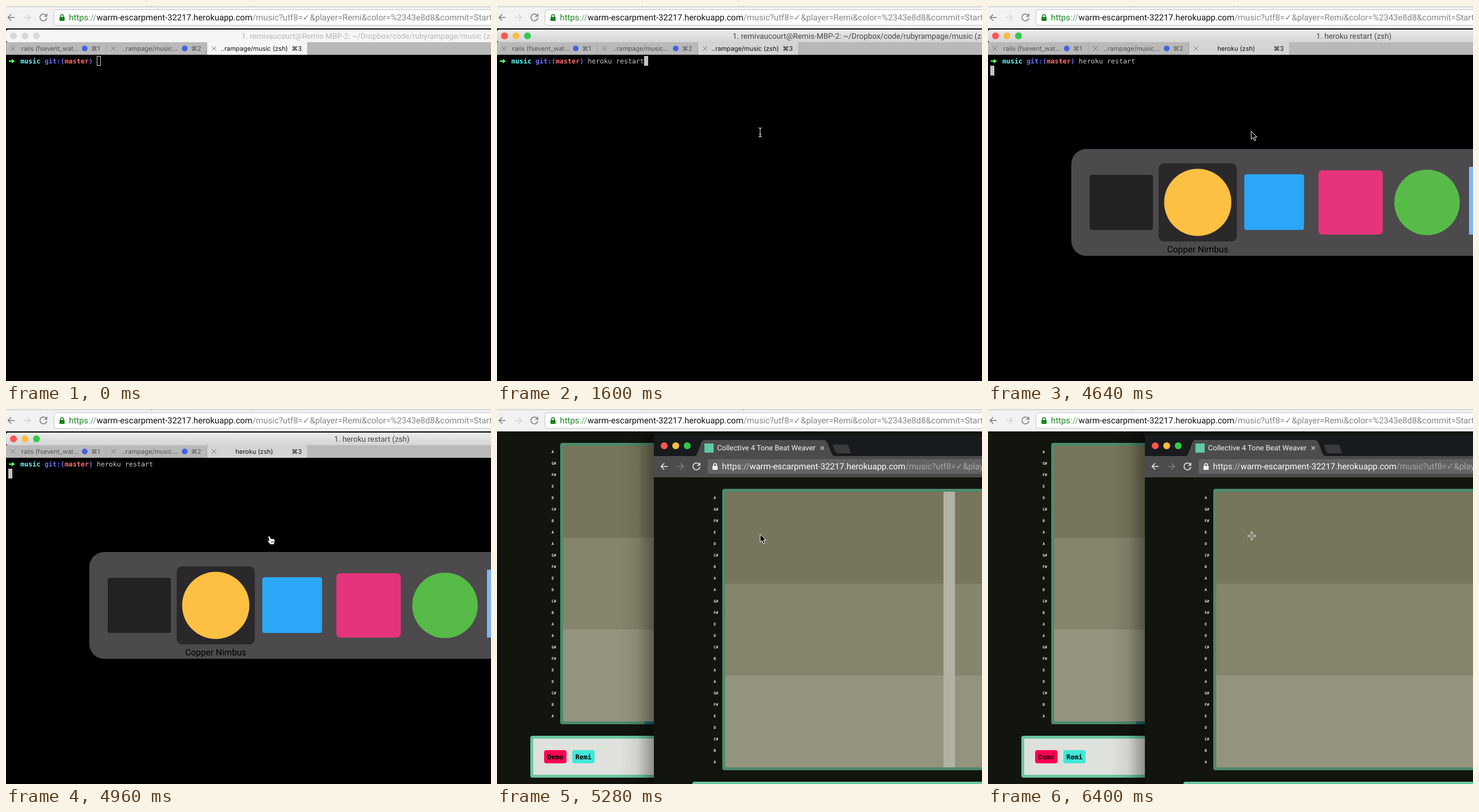
Animation of 844 by 653 pixels, one loop 8 s. Source, as an HTML page:

```html
<!DOCTYPE html>
<html>
<head>
<meta charset="utf-8">
<style>
  html, body { margin: 0; width: 100%; height: 100%; overflow: hidden; background: #000; }
  svg { display: block; }
  text { font-family: Roboto, "DejaVu Sans", sans-serif; white-space: pre; text-rendering: geometricPrecision; }
  .mono { font-family: "DejaVu Sans Mono", monospace; font-size: 11.63px; }
  .bold { font-weight: bold; }
  .url { font-size: 14.77px; }
  .tab { font-family: Inter, sans-serif; font-size: 11px; fill: #555; }
  .line { fill: none; stroke-width: 1.6; }
</style>
</head>
<body>
<svg id="stage" width="844" height="653" viewBox="0 0 844 653"></svg>
<script>
const LIGHT = { bar: '#f2f2f2', field: '#fff', edge: '#c4c4c4', icon: '#7b7b7b', off: '#d2d2d2',
  lock: '#1b8420', scheme: '#1b8420', slashes: '#6ba36e', host: '#111', path: '#858585' };
const DARK = { bar: '#4c4c4c', field: '#636363', edge: '#424242', icon: '#ececec', off: '#7c7c7c',
  lock: '#f2f2f2', scheme: '#f2f2f2', slashes: '#c4c4c4', host: '#fff', path: '#a9a9a9' };

const rect = (x, y, w, h, fill, extra = '') =>
  `<rect x="${x}" y="${y}" width="${w}" height="${h}" fill="${fill}" ${extra}/>`;
const circle = (x, y, r, fill, extra = '') =>
  `<circle cx="${x}" cy="${y}" r="${r}" fill="${fill}" ${extra}/>`;
const text = (x, y, content, extra = '') => `<text x="${x}" y="${y}" ${extra}>${content}</text>`;
const path = (d, stroke, extra = '') => `<path d="${d}" class="line" stroke="${stroke}" ${extra}/>`;
const span = (fill, content) => `<tspan fill="${fill}">${content}</tspan>`;
const lights = (x, y, colors = ['#fc5753', '#fdbc40', '#34c84a']) =>
  colors.map((c, i) => circle(x + 20 * i, y, 6, c)).join('');

const toolbar = c => rect(-9, 2, 900, 37, c.bar)
  + path('M15 20H4M9 14.5L3.5 20L9 25.5', c.icon)
  + path('M31 20H42M37 14.5L42.5 20L37 25.5', c.off)
  + path('M70 16.5A6 6 0 1 0 71 21M71 13.5V18H66.5', c.icon)
  + rect(83.5, 6.5, 900, 27, c.field, `rx="4" stroke="${c.edge}"`)
  + rect(93, 19, 9, 7, c.lock, 'rx="1"') + path('M95 20V17.5A2.5 2.5 0 0 1 100 17.5V20', c.lock)
  + text(109.5, 25, span(c.scheme, 'https') + span(c.slashes, '://')
    + span(c.host, 'warm-escarpment-32217.herokuapp.com')
    + span(c.path, '/music?utf8=✓&amp;player=Remi&amp;color=%2343e8d8&amp;commit=Start'), 'class="url"');

const notes = 'A G# F# E D C# B A'.split(' ');
const badge = (x, name, fill) => rect(x, 594, 39, 23, fill, 'rx="4"')
  + text(x + 5.5, 610, name, 'class="mono bold"');

const page = () => rect(-9, 39, 900, 700, '#12140e')
  + [0, 1, 2].flatMap(octave => notes.map((note, i) =>
    text(95, 76.5 + 160 * octave + 20 * i, note, 'class="mono bold" fill="#e8eae4" style="font-size:6.6px"'))).join('')
  + rect(110, 59, 900, 490, '#4c8b6c', 'rx="4"')
  + ['#77755b', '#85846c', '#94937e'].map((c, i) => rect(115, 64 + 160 * i, 900, 160, c)).join('')
  + rect(58, 569, 900, 73, '#69c79e', 'rx="4"') + rect(63, 574, 900, 63, '#dfe1dc')
  + badge(82, 'Demo', '#ff0052') + badge(131, 'Remi', '#40e8d8');

const closeMark = x => path(`M${x - 4} 70l8 8m0 -8l-8 8`, '#777', 'style="stroke-width:1"');
const tabBar = rect(0, 63, 844, 22, '#b9b9b9')
  + rect(350, 63, 174, 22, '#d4d4d4', 'id="activeTab"')
  + rect(174, 63, 1, 22, '#a2a2a2') + rect(349, 63, 1, 22, '#a2a2a2') + rect(0, 84, 350, 1, '#a9a9a9')
  + [12, 187, 362].map(closeMark).join('')
  + text(26.5, 78, 'rails (fsevent_wat...', 'class="tab"') + circle(137, 74, 5, '#4262e2')
  + text(148, 78, '⌘1', 'class="tab"')
  + text(202, 78, '..rampage/music...', 'class="tab"') + circle(311, 74, 5, '#4262e2')
  + text(322, 78, '⌘2', 'class="tab"')
  + text(432, 78, '', 'id="tabTitle" class="tab" style="fill:#111" text-anchor="middle"')
  + text(497, 78, '⌘3', 'class="tab" style="fill:#111"');

const terminal = rect(0, 39, 844, 614, '#000')
  + rect(0, 41, 860, 22, '', 'id="titleBar" rx="4"')
  + `<g id="lightsOn">${lights(13, 52)}</g><g id="lightsOff">${lights(13, 52, Array(3).fill('#d9d9d9'))}</g>`
  + text(410, 57, '', 'id="title" style="font-size:13.4px"')
  + tabBar
  + path('M5 96H11', '#5ffa68', 'style="stroke-width:2.4"') + '<path d="M10 92L15.5 96L10 100Z" fill="#5ffa68"/>'
  + text(25, 100, span('#60fdff', 'music ') + span('#6871ff', 'git:(') + span('#ff6e67', 'master')
    + span('#6871ff', ')'), 'class="mono bold"')
  + text(158, 100, 'heroku restart', 'id="command" class="mono" fill="#c7c7c7"')
  + rect(0, 0, 7, 17, '#c4c4c4', 'id="caret"');

const switcher = rect(145, 249, 760, 186, '#4c4a4c', 'rx="26"')
  + rect(297, 274, 136, 136, '#2a282b', 'rx="9"')
  + rect(177, 294, 110, 96, '#222', 'rx="4"')
  + circle(365, 342, 58.5, '#fdc042')
  + rect(446, 293, 104, 97, '#2aa7f6', 'rx="4"')
  + rect(575, 286, 112, 112, '#e5347b', 'rx="7"')
  + circle(764, 342, 57, '#57bb48')
  + rect(837, 280, 100, 118, '#80b6f4')
  + text(365, 429, 'Copper Nimbus', 'text-anchor="middle" style="font-size:15.4px"');

const frontWindow = rect(273, 45, 600, 640, '#171b1e') + lights(291, 64)
  + '<path d="M345 82C351 80 353 54 361 54H569C578 54 579 80 587 82Z" fill="#4c4c4c"/>'
  + '<path d="M584 62H609Q611 62 612 65L616 77H593Q590 77 588 73Z" fill="#3a3a3a"/>'
  + rect(361, 60, 16, 16, '#5fc9a2')
  + text(383, 72, 'Collective 4 Tone Beat Weaver', 'fill="#f4f4f4" style="font-size:12.8px"')
  + path('M563 65l6 6m0 -6l-6 6', '#ccc', 'style="stroke-width:1.3"')
  + `<g transform="translate(282 80)">${toolbar(DARK)}${page()}</g>`
  + rect(0, 144, 20, 480, '#b0b2a2', 'id="playhead"');

// Pointers are drawn around their hot spot.
const pointers = {
  arrow: '<path d="M0 0V14L3.2 11L5.5 16.5L8 15.5L5.7 10.2H10Z" fill="#000" stroke="#fff"/>',
  beam: path('M-3 -8Q0 -8 0 -5V5Q0 8 -3 8M3 -8Q0 -8 0 -5V5Q0 8 3 8M-2 3H2', '#ccc', 'style="stroke-width:1.2"'),
  hand: '<path d="M-2 -6Q0 -8 1 -6L3 -2Q8 -3 10 0V4L8 8H2L-3 2Q-4 0 -1 1L0 2Z" fill="#fff" stroke="#000"/>'
    + path('M4 2V5M6 2V5M8 2V5', '#000', 'style="stroke-width:.8"'),
  cross: path('M-7 0H7M0 -7V7', '#fff', 'style="stroke-width:3"') + path('M-6 0H6M0 -6V6', '#111', 'style="stroke-width:1"')
};

document.getElementById('stage').innerHTML =
  `<defs><linearGradient id="shade"><stop stop-opacity="0"/><stop offset=".5" stop-opacity=".07"/>
   <stop offset="1" stop-opacity=".36"/></linearGradient>
   <linearGradient id="chrome" x2="0" y2="1"><stop stop-color="#ebebeb"/><stop offset="1" stop-color="#d4d4d4"/>
   </linearGradient></defs>`
  + rect(0, 0, 844, 2, '#ededed') + rect(0, 1, 844, 1, '#c6c6c6')
  + [252, 428].map(x => rect(x, 0, 1, 2, '#aaa')).join('')
  + toolbar(LIGHT)
  + `<g id="terminal">${terminal}</g>`
  + `<g id="browser">${page()}${rect(257, 544, 16, 5, '#1f6b70')}`
  + `${rect(215, 39, 58, 614, 'url(#shade)')}${frontWindow}</g>`
  + `<g id="switcher">${switcher}</g>`
  + Object.entries(pointers).map(([id, shape]) => `<g id="${id}">${shape}</g>`).join('');

const $ = id => document.getElementById(id);
const show = (id, on) => $(id).style.display = on ? '' : 'none';
const set = (id, attrs) => Object.entries(attrs).forEach(([k, v]) => $(id).setAttribute(k, v));

// Each track lists [start time, ...values]; the last one begun applies.
const at = (track, t) => track.filter(step => step[0] <= t).pop().slice(1);
const pointerTrack = [[0, ''], [160, 'arrow', 502, 423], [320, 'arrow', 470, 252], [480, 'arrow', 462, 249],
  [640, 'arrow', 458, 234], [800, 'arrow', 458, 218], [1120, 'beam', 458, 220], [4320, 'arrow', 458, 218],
  [4960, 'hand', 458, 228], [5280, 'arrow', 458, 218], [5920, 'cross', 459, 221]];
const switcherTrack = [[0, 0], [4640, 1], [5120, .14], [5280, 0]];

function draw(t) {
  const focused = t >= 1120, typed = t >= 1600, running = t >= 4160, browsing = t >= 5120;
  show('terminal', !browsing);
  show('browser', browsing);

  show('lightsOn', focused);
  show('lightsOff', !focused);
  show('command', typed);
  set('titleBar', { fill: focused ? 'url(#chrome)' : '#f6f6f6' });
  set('activeTab', { fill: focused ? '#d4d4d4' : '#f6f6f6' });
  set('title', { x: running ? 571 : 410, fill: focused ? '#484848' : '#b6b6b6' });
  $('title').textContent = running ? '1. heroku restart (zsh)'
    : '1. remivaucourt@Remis-MBP-2: ~/Dropbox/code/rubyrampage/music (zsh)';
  $('tabTitle').textContent = running ? 'heroku (zsh)' : '..rampage/music (zsh)';
  set('caret', focused
    ? { x: running ? 4 : typed ? 256 : 158, y: running ? 104 : 87, width: 7, height: 17, fill: '#c4c4c4', stroke: 'none' }
    : { x: 158.5, y: 87.5, width: 6, height: 16, fill: 'none', stroke: '#d0d0d0' });

  set('switcher', { opacity: at(switcherTrack, t)[0] });
  set('playhead', { x: 777 + 20 * Math.max(0, Math.floor((t - 5280) / 160)) });

  const [pointer, x, y] = at(pointerTrack, t);
  for (const id in pointers) show(id, id === pointer);
  if (pointer) set(pointer, { transform: `translate(${x} ${y})` });
}

const start = performance.now();
function tick() {
  draw((performance.now() - start) % 8000);
  requestAnimationFrame(tick);
}
draw(0);
requestAnimationFrame(tick);
</script>
</body>
</html>
```
